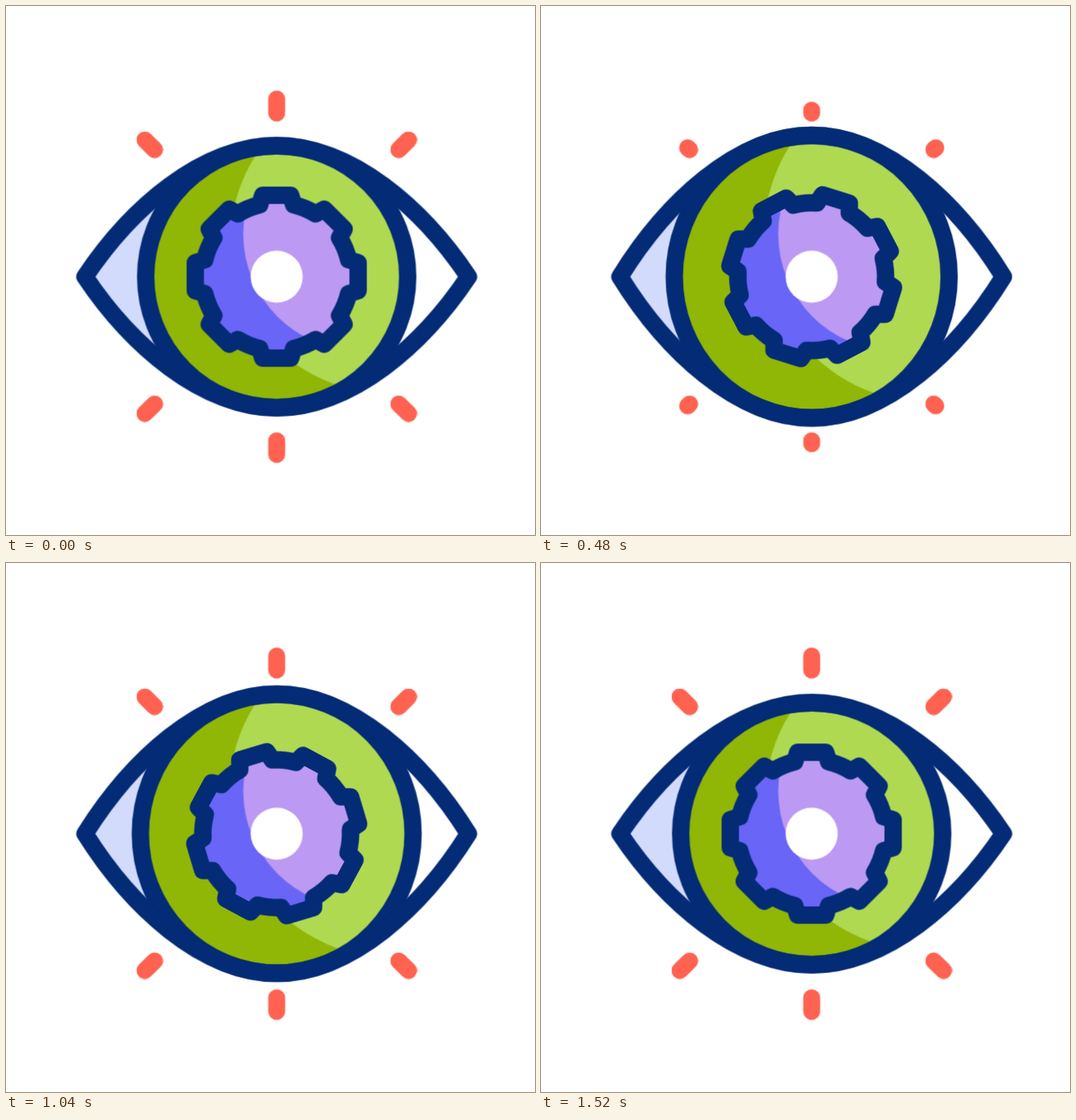
Animation of 640x640 px, one loop 1.56 s. Source, as an HTML page:

```html
<!DOCTYPE html>
<html lang="en">
<head>
<meta charset="utf-8">
<title>Eye</title>
<style>
  html, body { margin: 0; width: 100%; height: 100%; overflow: hidden; background: #fff; }
  svg { display: block; width: 640px; height: 640px; }

  .line {
    fill: none;
    stroke: #042b76;
    stroke-width: 21;
    stroke-linejoin: round;
    vector-effect: non-scaling-stroke;
  }
  .lid, .iris, .spin, .still, .sparks path { animation: 1560ms linear infinite; }
  .lid { animation-name: lid; }
  .iris { animation-name: iris; }
  .spin { animation-name: spin; }
  .still { animation-name: unspin; }
  .sparks path {
    fill: none;
    stroke: #ff6250;
    stroke-width: 20.5;
    stroke-linecap: round;
    stroke-dasharray: 1 2;
    animation-name: trim, blink;
    animation-timing-function: linear, step-end;
  }

  @keyframes lid {
    0%, 2.56% { transform: scale(1, 1); animation-timing-function: cubic-bezier(.55, 0, .45, 1); }
    46.15% { transform: scale(1, 1.099); }
    47.4% { transform: scale(1, 1.099); animation-timing-function: cubic-bezier(.5, 0, .5, 1); }
    93.6%, 100% { transform: scale(1, 1); }
  }
  @keyframes iris {
    0%, 2.56% { transform: scale(1, 1); animation-timing-function: cubic-bezier(.55, 0, .45, 1); }
    46.15% { transform: scale(1.062, 1.099); }
    47.4% { transform: scale(1.062, 1.099); animation-timing-function: cubic-bezier(.5, 0, .5, 1); }
    93.6%, 100% { transform: scale(1, 1); }
  }
  @keyframes spin {
    0%, 5.13% { transform: rotate(0deg); animation-timing-function: cubic-bezier(.443, 0, .557, 1); }
    92.31%, 100% { transform: rotate(360deg); }
  }
  @keyframes unspin {
    0%, 5.13% { transform: rotate(0deg); animation-timing-function: cubic-bezier(.443, 0, .557, 1); }
    92.31%, 100% { transform: rotate(-360deg); }
  }
  @keyframes trim {
    0%, 2% { stroke-dashoffset: 0; animation-timing-function: ease-in-out; }
    19.2% { stroke-dashoffset: -1; }
    19.21% { stroke-dashoffset: 1; }
    24.4% { stroke-dashoffset: 1; animation-timing-function: ease-in-out; }
    44.9%, 100% { stroke-dashoffset: 0; }
  }
  @keyframes blink {
    0% { opacity: 1; }
    19.2% { opacity: 0; }
    24.4%, 100% { opacity: 1; }
  }
</style>
</head>
<body>
<svg viewBox="0 0 640 640">
  <defs>
    <clipPath id="irisClip"><circle r="158"/></clipPath>
    <clipPath id="gearClip"><path class="gear"/></clipPath>
  </defs>
  <g transform="translate(327.5 327.5)">
    <path class="lid" fill="#d2dbfc"
      d="M-232 0C-177.5-81.5-91.5-158.5 0-158.5V158.5C-91.5 158.5-177.5 81.5-232 0Z"/>

    <g class="iris">
      <circle r="158" fill="#90b606"/>
      <g clip-path="url(#irisClip)"><circle cx="130.2" cy="-45.7" r="185.5" fill="#afd951"/></g>
      <circle class="line" r="158.5"/>
    </g>

    <path class="lid line"
      d="M-232 0C-177.5-81.5-91.5-158.5 0-158.5S177.5-81.5 232 0C177.5 81.5 91.5 158.5 0 158.5S-177.5 81.5-232 0Z"/>

    <g class="spin">
      <g clip-path="url(#gearClip)">
        <g class="still">
          <circle r="110" fill="#6865f7"/>
          <circle cx="100.5" cy="-51.5" r="141" fill="#bc99f2"/>
        </g>
      </g>
      <path class="gear line"/>
    </g>
    <circle r="31.5" fill="#fff"/>

    <g class="sparks">
      <path pathLength="1" d="M0-198V-215"/>
      <path pathLength="1" d="M0 198.5V215"/>
      <path pathLength="1" d="M-147.7-153.7L-159.5-165.5"/>
      <path pathLength="1" d="M147.7-153.7L159.5-165.5"/>
      <path pathLength="1" d="M-147.7 154L-159.5 165.5"/>
      <path pathLength="1" d="M147.7 154L159.5 165.5"/>
    </g>
  </g>
</svg>
<script>
  const TEETH = 8, ROOT = 89.5;
  const tooth = [[-20.5, -87], [-17, -98.5], [17, -98.5], [20.5, -87]];

  function turn([x, y], a) {
    const c = Math.cos(a), s = Math.sin(a);
    return (x * c - y * s).toFixed(2) + ' ' + (x * s + y * c).toFixed(2);
  }

  let d = '';
  for (let i = 0; i < TEETH; i++) {
    const [p, q, r, s] = tooth.map(pt => turn(pt, i * 2 * Math.PI / TEETH));
    d += (i ? `A${ROOT} ${ROOT} 0 0 1 ` : 'M') + `${p}L${q}L${r}L${s}`;
  }
  d += `A${ROOT} ${ROOT} 0 0 1 ${turn(tooth[0], 0)}Z`;
  document.querySelectorAll('.gear').forEach(el => el.setAttribute('d', d));
</script>
</body>
</html>
```
